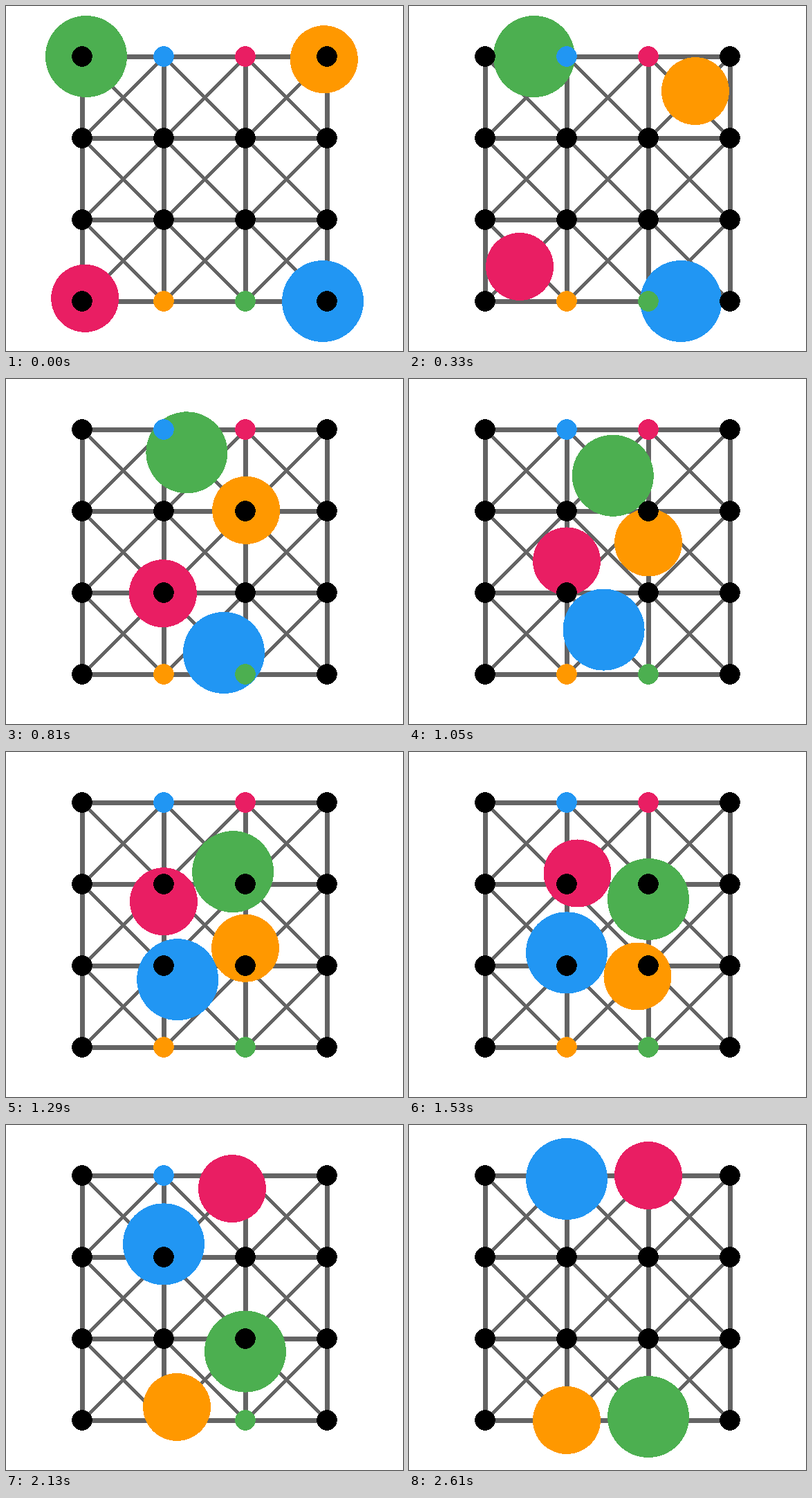
Write an HTML page that moves like this. It is 574 px wide and 499 px high and loops after 2640 ms.

```html
<!DOCTYPE html>
<html lang="en">
<head>
<meta charset="utf-8">
<title>Agents on a grid</title>
<style>
  html, body { margin: 0; width: 100%; height: 100%; overflow: hidden; background: #fff; }
  svg { display: block; shape-rendering: crispEdges; }
  line { stroke: #646464; }
</style>
</head>
<body>
<svg id="stage" width="574" height="499" viewBox="0 0 574 499"></svg>
<script>
const CELL = 118, LEFT = 110, TOP = 73, N = 4;
const FRAME = 30, FRAMES = 88, STEPS_PER_CELL = 20, WAIT = 0.56;
const GREEN = '#4caf50', BLUE = '#2196f3', PINK = '#e91e63', ORANGE = '#ff9800';

// Stops are [column, row, optional wait in steps].
const agents = [
  { color: GREEN, r: 59, stops: [[0, 0], [1, 0], [2, 1], [2, 2, WAIT], [2, 3]] },
  { color: BLUE, r: 59, stops: [[3, 3], [2, 3, WAIT], [1, 2], [1, 1], [1, 0]] },
  { color: PINK, r: 49, stops: [[0, 3], [1, 2], [1, 1], [2, 0]] },
  { color: ORANGE, r: 49, stops: [[3, 0], [2, 1], [2, 2], [1, 3]] }
];

const stage = document.getElementById('stage');
const px = col => LEFT + col * CELL;
const py = row => TOP + row * CELL;

function add(tag, attrs) {
  const el = document.createElementNS('http://www.w3.org/2000/svg', tag);
  for (const key in attrs) el.setAttribute(key, attrs[key]);
  return stage.appendChild(el);
}

function edge(c1, r1, c2, r2) {
  add('line', {
    x1: px(c1) + 0.5, y1: py(r1) + 0.5, x2: px(c2) + 0.5, y2: py(r2) + 0.5,
    'stroke-width': c1 !== c2 && r1 !== r2 ? 5 : 7
  });
}

function disc(col, row, r, fill) {
  return add('circle', { cx: px(col), cy: py(row), r, fill });
}

for (let i = 0; i < N; i++) {
  edge(0, i, N - 1, i);
  edge(i, 0, i, N - 1);
}
for (let row = 0; row < N - 1; row++) {
  for (let col = 0; col < N - 1; col++) {
    edge(col, row, col + 1, row + 1);
    edge(col + 1, row, col, row + 1);
  }
}

const goals = {};
for (const a of agents) {
  a.el = disc(...a.stops[0].slice(0, 2), a.r, a.color);
  goals[a.stops[a.stops.length - 1].join()] = a.color;
}
for (let row = 0; row < N; row++) {
  for (let col = 0; col < N; col++) {
    disc(col, row, 14.75, goals[[col, row].join()] || '#000');
  }
}

function locate(stops, step) {
  for (let i = 1; i < stops.length; i++) {
    const [c1, r1] = stops[i - 1], [c2, r2, wait = 0] = stops[i];
    const duration = Math.hypot(c2 - c1, r2 - r1) * STEPS_PER_CELL;
    if (step < duration + wait) {
      const k = Math.min(step / duration, 1);
      return [c1 + (c2 - c1) * k, r1 + (r2 - r1) * k];
    }
    step -= duration + wait;
  }
  return stops[stops.length - 1];
}

let start;
function draw(now) {
  start ??= now;
  const step = Math.floor((now - start) / FRAME) % FRAMES + 1;
  for (const { el, stops } of agents) {
    const [col, row] = locate(stops, step);
    el.setAttribute('cx', px(col));
    el.setAttribute('cy', py(row));
  }
  requestAnimationFrame(draw);
}
requestAnimationFrame(draw);
</script>
</body>
</html>
```
